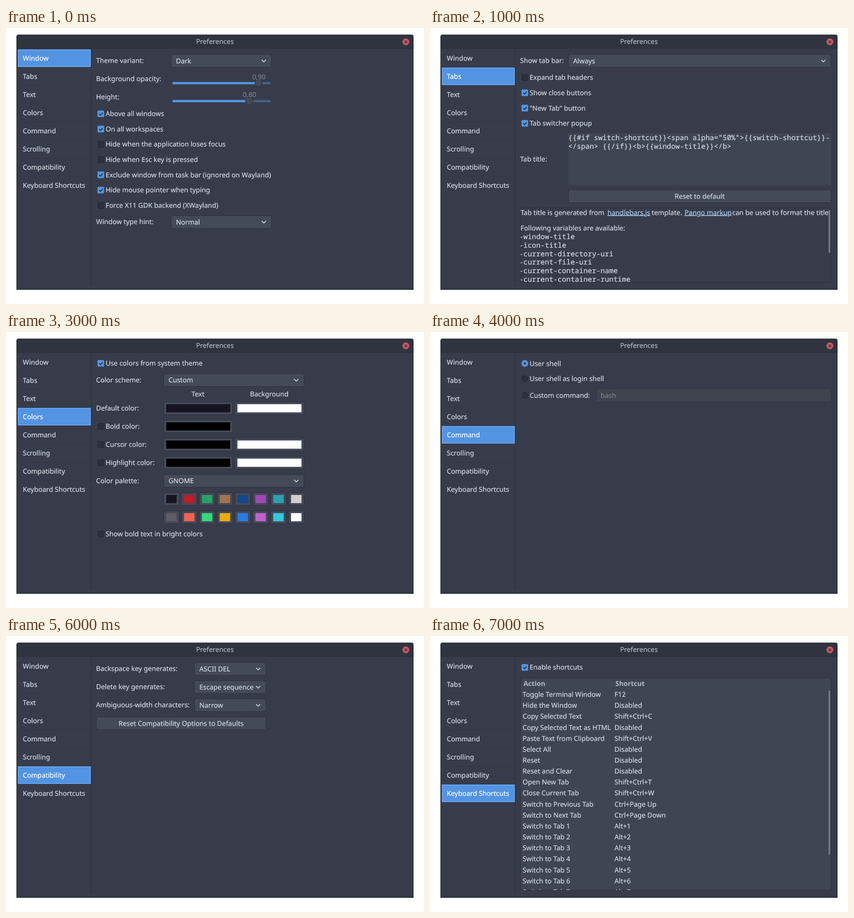
Animation, 921 px wide and 608 px high, one loop 8 s. Source, as an HTML page:

```html
<!DOCTYPE html>
<html lang="en">
<head>
<meta charset="utf-8">
<title>Preferences</title>
<style>
  html, body { margin: 0; width: 100%; height: 100%; overflow: hidden; background: #fff; }
  svg { display: block; width: 921px; height: 608px; }
  text { font: 14.95px "Noto Sans", sans-serif; color: #d3dae3; fill: currentColor; stroke: currentColor;
         stroke-width: .22px; white-space: pre; text-rendering: geometricPrecision; }
  .mono { font: 15.75px "Noto Sans Mono", monospace; }
  .mid { text-anchor: middle; }
  .dim { color: #7c818c; }
  .head { font-weight: 700; color: #b4bac4; stroke: none; }
  .title { color: #b4bac4; }
  .link { color: #a9caf1; text-decoration: underline; }
  .selected { color: #fff; }
</style>
</head>
<body>
<svg id="stage" viewBox="0 0 921 608"></svg>
<script>
const PAGE_MS = 1000;
const BLUE = '#5294e2', BODY = '#383c4a', BAR = '#2f343f', EDGE = '#2b2e39',
      BUTTON = '#444a58', FIELD = '#404552', WELL = '#2d303b', LIGHT = '#d3dae3';

// Every y below is the vertical centre of the part.
const text = (x, y, str, cls = '') => {
  const safe = str.replace(/&/g, '&amp;').replace(/</g, '&lt;');
  return `<text x="${x}" y="${y + 5.2}" class="${cls}">${safe}</text>`;
};
const rect = (x, y, w, h, fill, extra = '') =>
  `<rect x="${x}" y="${y}" width="${w}" height="${h}" fill="${fill}" ${extra}/>`;
const path = (d, stroke, width, extra = '') =>
  `<path d="${d}" fill="none" stroke="${stroke}" stroke-width="${width}" ${extra}/>`;
const circle = (x, y, r, fill, extra = '') =>
  `<circle cx="${x}" cy="${y}" r="${r}" fill="${fill}" ${extra}/>`;
const outline = color => `stroke="${color}"`;

const box = (left, right, y, fill = BUTTON, edge = EDGE) =>
  rect(left + .5, y - 14, right - left - 1, 28, fill, `rx="2.5" ${outline(edge)}`);
const button = (left, right, y, label) =>
  box(left, right, y) + text((left + right) / 2, y, label, 'mid');
const combo = (left, right, y, label) =>
  box(left, right, y) + text(left + 11, y, label) +
  path(`M${right - 22} ${y - 2.3}l4.6 4.6l4.6 -4.6`, LIGHT, 1.8);

const check = (y, label, on) =>
  (on
    ? rect(201.6, y - 7.3, 14.6, 14.6, BLUE, 'rx="2"') + path(`M205.3 ${y}l2.8 2.8l5 -5`, BAR, 2.1)
    : rect(202, y - 7, 14, 14, WELL, `rx="2" ${outline('#282b35')}`)) +
  text(219.5, y, label);
const radio = (y, label, on) =>
  circle(209, y, on ? 7.5 : 7, on ? BLUE : WELL, on ? '' : outline('#282b35')) +
  (on ? circle(209, y, 2.4, BAR) : '') + text(219.5, y, label);

const slider = (y, value, label) => {
  const left = 366.5, width = 216.5, knob = left + 3 + value * 208;
  return rect(left, y - 2.5, width, 5, '#41628f', 'rx="2"') +
    rect(left, y - 2.5, knob - left, 5, BLUE, 'rx="2"') +
    circle(knob, y, 8.3, BUTTON, outline(EDGE)) +
    text(knob + .5, y - 14, label, 'mid dim');
};
const scrollbar = (top, bottom) => rect(878, top, 4, bottom - top, '#70757f', 'rx="2"');

const windowPage = () =>
  text(198.5, 72, 'Theme variant:') + combo(363.5, 585.5, 72.5, 'Dark') +
  text(198.5, 112, 'Background opacity:') + slider(121.5, .9, '0,90') +
  text(198.5, 152, 'Height:') + slider(161, .8, '0,80') +
  [['Above all windows', 1], ['On all workspaces', 1],
   ['Hide when the application loses focus', 0], ['Hide when Esc key is pressed', 0],
   ['Exclude window from task bar (ignored on Wayland)', 1],
   ['Hide mouse pointer when typing', 1], ['Force X11 GDK backend (XWayland)', 0]]
    .map(([label, on], i) => check(189 + i * 33.6, label, on)).join('') +
  text(198.5, 427, 'Window type hint:') + combo(363.5, 585.5, 427.5, 'Normal');

const tabsPage = () =>
  text(198.5, 72, 'Show tab bar:') + combo(304.5, 884, 72.5, 'Always') +
  check(109.2, 'Expand tab headers', 0) + check(142.8, 'Show close buttons', 1) +
  check(176.4, '"New Tab" button', 1) + check(210, 'Tab switcher popup', 1) +
  text(198.5, 288.5, 'Tab title:') + rect(304.5, 232, 579.5, 114, FIELD) +
  text(304.5, 241.5, '{{#if switch-shortcut}}<span alpha="50%">{{switch-shortcut}}-', 'mono') +
  text(304.5, 260.3, '</span> {{/if}}<b>{{window-title}}</b>', 'mono') +
  button(304.5, 884, 370.8, 'Reset to default') +
  rect(199, 396.5, 684.5, 163.5, 'none', outline(EDGE)) +
  text(199.5, 406.3, 'Tab title is generated from') + text(391, 406.3, 'handlebars.js', 'link') +
  text(488.5, 406.3, 'template.') + text(561, 406.3, 'Pango markup', 'link') +
  text(666, 406.3, 'can be used to format the title.') +
  text(199.5, 441, 'Following variables are available:') +
  ['window-title', 'icon-title', 'current-directory-uri', 'current-file-uri',
   'current-container-name', 'current-container-runtime']
    .map((name, i) => text(199, 459.7 + i * 18.8, '-') + text(205.7, 459.7 + i * 18.8, name, 'mono')).join('') +
  scrollbar(401, 496);

const textPage = () =>
  check(72.5, 'Custom font:', 0) + box(342.5, 606, 72.5, '#3e4350', '#323642') +
  text(354.5, 72.3, 'JetBrains Mono Regular', 'mono dim') + text(576, 72.3, '10', 'mono dim') +
  [['Allow blinking text:', 'Always'], ['Cursor shape:', 'Block'], ['Cursor blinking:', 'Default']]
    .map(([label, value], i) =>
      text(198.5, 112 + i * 40, label) + combo(342.5, 606, 112.5 + i * 40, value)).join('') +
  check(229, 'Allow hyperlinks', 1) + check(262.5, 'Audible bell', 1);

const swatch = (left, right, y, color) =>
  box(left, right, y) + rect(left + 6, y - 9, right - left - 12, 18, color);

const colorsPage = () => {
  const palette = ['#171421', '#c01c28', '#26a269', '#a2734c', '#12488b', '#a347ba', '#2aa1b3', '#d0cfcc',
                   '#5e5c64', '#f66151', '#33da7a', '#e9ad0c', '#2a7bde', '#c061cb', '#33c7de', '#ffffff'];
  const left = 347, right = 657;
  const pair = (y, fore, back) => swatch(left, 500, y, fore) + swatch(504, right, y, back);
  return check(69, 'Use colors from system theme', 1) +
    text(198.5, 106, 'Color scheme:') + combo(left, right, 106, 'Custom') +
    text(423, 137, 'Text', 'mid') + text(580, 137, 'Background', 'mid') +
    text(198.5, 168, 'Default color:') + pair(168, '#171421', '#ffffff') +
    check(208, 'Bold color:', 0) + swatch(left, 500, 208, '#000000') +
    check(248, 'Cursor color:', 0) + pair(248, '#000000', '#ffffff') +
    check(288, 'Highlight color:', 0) + pair(288, '#000000', '#ffffff') +
    text(198.5, 328, 'Color palette:') + combo(left, right, 328, 'GNOME') +
    palette.map((color, i) => {
      const x = left + i % 8 * 39.3;
      return swatch(x, x + 35, i < 8 ? 368 : 408, color);
    }).join('') +
    check(445, 'Show bold text in bright colors', 0);
};

const commandPage = () =>
  radio(69.3, 'User shell', 1) + radio(102.8, 'User shell as login shell', 0) +
  radio(139.6, 'Custom command:', 0) + box(366.5, 884, 139.6, '#3e434e', '#333743') +
  text(376, 139.6, 'bash', 'dim');

const scrollingPage = () =>
  check(69.2, 'Show scrollbar', 1) + check(102.8, 'Scroll on output', 0) +
  check(136.4, 'Scroll on keystroke', 1) + check(173, 'Limit scrollback to:', 1) +
  box(367, 525, 173, FIELD) + text(376, 173, '10000') +
  path('M467.5 159.5v27M496.5 159.5v27', EDGE, 1) +
  path('M477 173h10M506 173h10M511 168v10', LIGHT, 1.8) +
  text(533, 173, 'lines');

const compatibilityPage = () =>
  [['Backspace key generates:', 'ASCII DEL'], ['Delete key generates:', 'Escape sequence'],
   ['Ambiguous-width characters:', 'Narrow']]
    .map(([label, value], i) =>
      text(198.5, 72 + i * 40, label) + combo(415, 573, 72.5 + i * 40, value)).join('') +
  button(198.5, 573, 192.3, 'Reset Compatibility Options to Defaults');

const shortcutsPage = () => {
  const rows = [
    ['Toggle Terminal Window', 'F12'], ['Hide the Window', 'Disabled'],
    ['Copy Selected Text', 'Shift+Ctrl+C'], ['Copy Selected Text as HTML', 'Disabled'],
    ['Paste Text from Clipboard', 'Shift+Ctrl+V'], ['Select All', 'Disabled'],
    ['Reset', 'Disabled'], ['Reset and Clear', 'Disabled'],
    ['Open New Tab', 'Shift+Ctrl+T'], ['Close Current Tab', 'Shift+Ctrl+W'],
    ['Switch to Previous Tab', 'Ctrl+Page Up'], ['Switch to Next Tab', 'Ctrl+Page Down']];
  for (let n = 1; n <= 7; n++) rows.push([`Switch to Tab ${n}`, `Alt+${n}`]);
  return check(69.2, 'Enable shortcuts', 1) +
    rect(199, 92.5, 684.5, 467.5, FIELD, outline(EDGE)) +
    text(206, 104.7, 'Action', 'head') + text(408.5, 104.7, 'Shortcut', 'head') +
    path('M401.5 97v15', '#4b505d', 1) +
    '<clipPath id="list"><rect x="199" y="93" width="685" height="466.5"/></clipPath><g clip-path="url(#list)">' +
    rows.map(([action, keys], i) =>
      text(204, 128.9 + i * 24.15, action) + text(406.5, 128.9 + i * 24.15, keys)).join('') +
    '</g>' + scrollbar(120, 482);
};

const pages = [
  ['Window', windowPage], ['Tabs', tabsPage], ['Text', textPage], ['Colors', colorsPage],
  ['Command', commandPage], ['Scrolling', scrollingPage],
  ['Compatibility', compatibilityPage], ['Keyboard Shortcuts', shortcutsPage]];

const frame = () =>
  path('M23.5 576V18.5q0 -3.5 3.5 -3.5H894q3.5 0 3.5 3.5V576Z', '#21242c', 1, `style="fill:${BODY}"`) +
  path('M24 45V19q0 -3.5 3.5 -3.5H893.5q3.5 0 3.5 3.5V45Z', 'none', 0, `style="fill:${BAR}"`) +
  path('M24 45h873', '#2a2e38', 1) + path('M23 575.7h875', '#21242c', 1.4) +
  text(460.3, 30.2, 'Preferences', 'mid title') +
  circle(881, 30.5, 7.5, '#cc575d') +
  path('M878.4 27.9l5.2 5.2m0 -5.2l-5.2 5.2', BAR, 1.6) +
  path('M187.5 47V571', EDGE, 1);

const sidebar = active => pages.map(([name], i) => {
  const top = 47 + i * 40;
  const line = i < pages.length - 1 ? path(`M26 ${top + 39.5}h161`, '#333743', 1) : '';
  const highlight = i === active
    ? rect(26, top, 161, 39, BLUE) +
      rect(27.5, top + 1.5, 158, 36, 'none', 'stroke="#a0c5f0" stroke-dasharray="1 1"')
    : '';
  return line + highlight + text(37, top + 19.8, name, i === active ? 'selected' : '');
}).join('');

const stage = document.getElementById('stage');
stage.innerHTML = frame() + pages.map(([, build], i) => `<g class="page">${sidebar(i)}${build()}</g>`).join('');
const groups = [...stage.querySelectorAll('.page')];

function draw() {
  const current = Math.floor(performance.now() / PAGE_MS) % pages.length;
  groups.forEach((group, i) => { group.style.display = i === current ? '' : 'none'; });
  requestAnimationFrame(draw);
}
draw();
</script>
</body>
</html>
```
